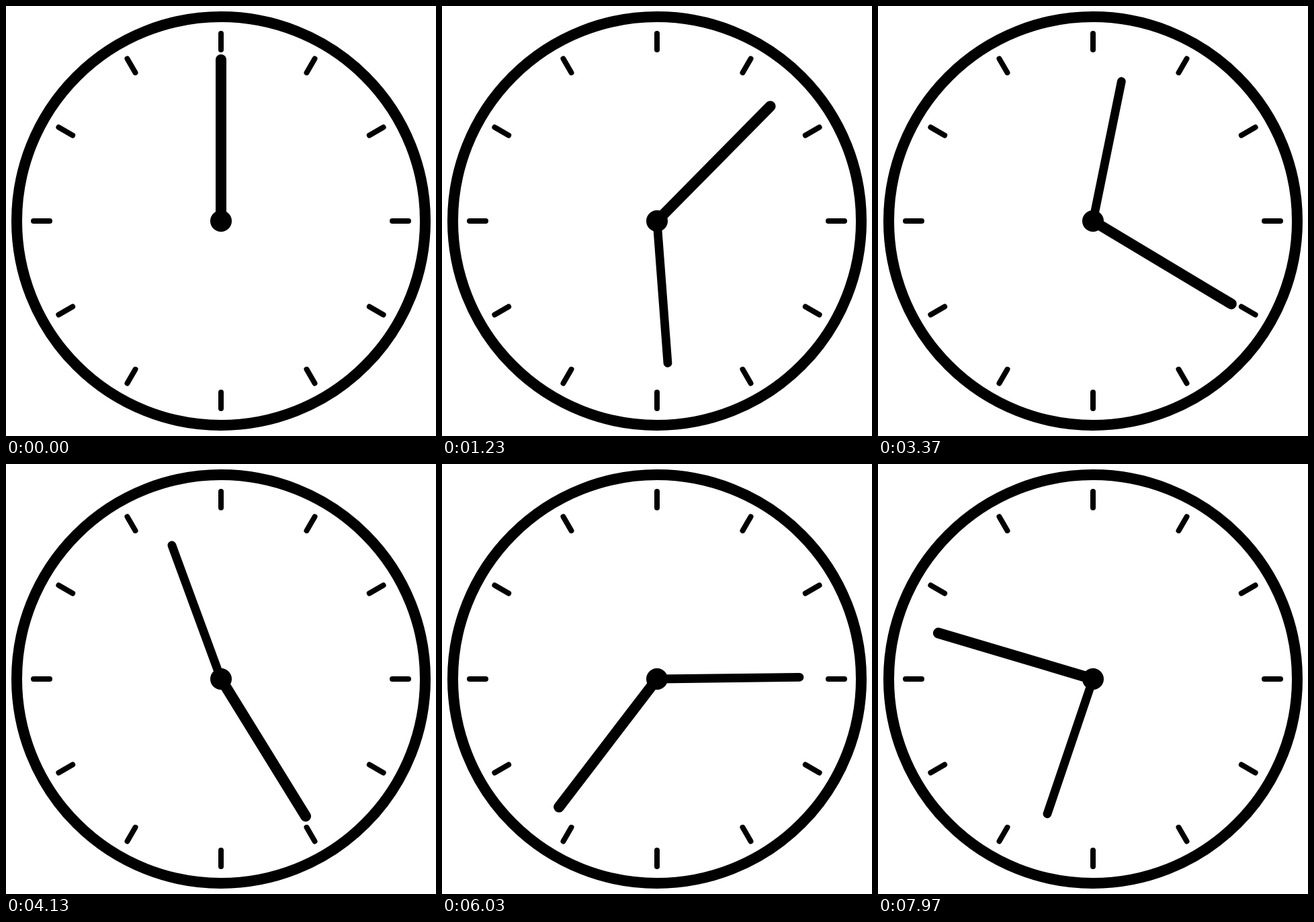
Recreate the animation shown at these times as an HTML page. Size 640 px wide and 640 px high, loop 8 s.

```html
<!DOCTYPE html>
<html lang="en">
<head>
<meta charset="utf-8">
<title>Clock</title>
<style>
  html, body { margin: 0; width: 100%; height: 100%; overflow: hidden; background: #fff; }
  svg { display: block; width: 100%; height: 100%; }
  line, .rim { stroke: #000; stroke-linecap: round; }
  .rim { fill: #fff; stroke-width: 16; }
  #ticks line { stroke-width: 8; }
  #slow { stroke-width: 16; }
  #fast { stroke-width: 12.8; }
</style>
</head>
<body>
<svg viewBox="-320 -320 640 640">
  <circle class="rim" r="304"/>
  <g id="ticks"></g>
  <line id="fast" y2="-212"/>
  <line id="slow" y2="-240"/>
  <circle r="16"/>
</svg>
<script>
  const LOOP = 8000;
  const STEPS = 200;
  const SLOW_STEP = 1.44; // degrees per step
  const FAST_STEP = SLOW_STEP * 12;

  const byId = id => document.getElementById(id);
  const rotate = (el, angle) => el.setAttribute('transform', `rotate(${angle % 360})`);

  for (let hour = 0; hour < 12; hour++) {
    const tick = document.createElementNS(byId('ticks').namespaceURI, 'line');
    tick.setAttribute('y1', -255);
    tick.setAttribute('y2', -279);
    rotate(tick, hour * 30);
    byId('ticks').append(tick);
  }

  // 25 steps per second, snapped to a 30 Hz grid and then to whole centiseconds.
  const stepStart = n => 10 * Math.round(Math.round(n * 1.2) * 10 / 3);

  function stepAt(time) {
    let n = Math.min(STEPS - 1, Math.floor(time / 40) + 1);
    while (n > 0 && stepStart(n) > time) n--;
    return n;
  }

  function draw(time) {
    const n = stepAt(time % LOOP);
    rotate(byId('slow'), n * SLOW_STEP);
    rotate(byId('fast'), n * FAST_STEP);
  }

  const start = performance.now();
  function tick(now) {
    draw(Math.max(0, now - start));
    requestAnimationFrame(tick);
  }
  draw(0);
  requestAnimationFrame(tick);
</script>
</body>
</html>
```
